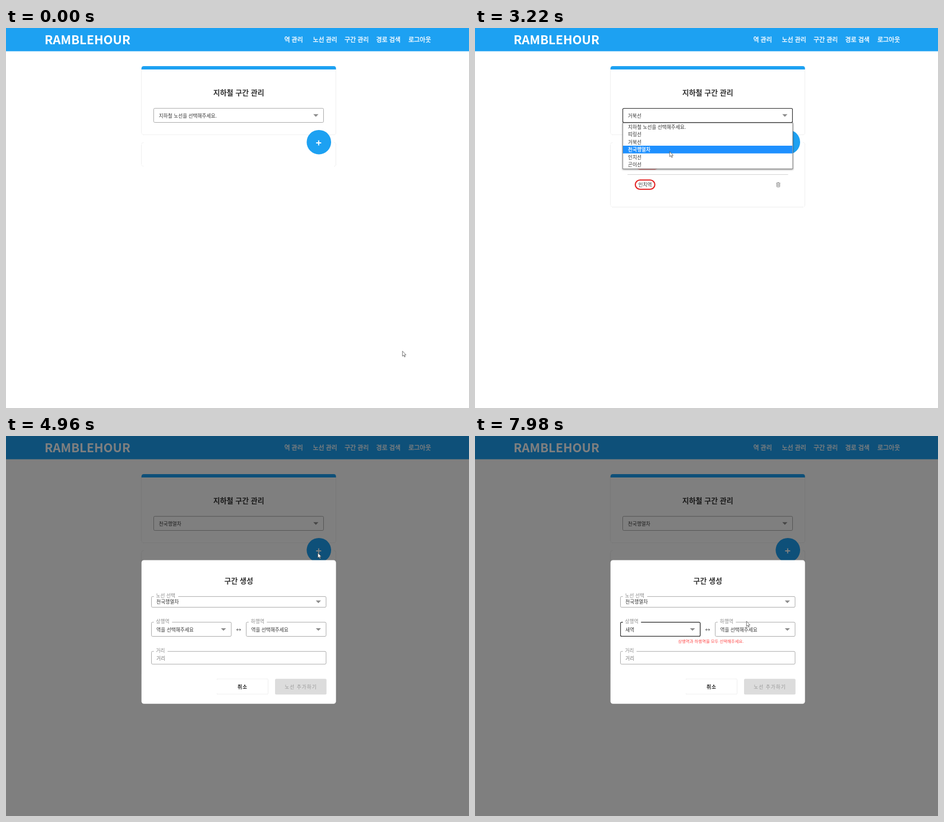
Animation, 826 px wide and 678 px high, one loop 8000 ms. Source, as an HTML page:

```html
<!DOCTYPE html>
<html lang="ko">
<head>
<meta charset="utf-8">
<title>지하철 구간 관리</title>
<style>
html, body { margin: 0; width: 100%; height: 100%; overflow: hidden; background: #fff; }
svg { display: block; width: 826px; height: 678px; }
text { font: 400 8.7px "Noto Sans CJK KR", "Noto Sans KR", "Noto Sans CJK", sans-serif; fill: #333; white-space: pre; }
.logo { font-size: 21.9px; font-weight: 700; fill: #fff; }
.nav text { font-size: 10.94px; fill: #fff; stroke: #fff; stroke-width: .35; }
.title { font-size: 13px; font-weight: 700; }
.mid { text-anchor: middle; }
.blue { fill: #1da1f2; }
.card { fill: #fff; filter: drop-shadow(0 .8px .7px rgba(0,0,0,.3)); }
.box { fill: #fff; stroke: #aaa; }
.ring { fill: none; stroke: #333; stroke-width: 1.2; }
.arrow { fill: #8c8c8c; }
.legend { fill: #8a8a8a; }
.hint { fill: #757575; }
.km { font-size: 6.4px; text-anchor: middle; }
.badge { fill: #fff; stroke-width: 2.1; }
.rule { stroke: #d3d3d3; }
.trash { fill: none; stroke: #8a8a8a; }
.btn { letter-spacing: 1px; font-weight: 700; fill: #222; }
.off { font-weight: 500; fill: #999; }
.err { font-size: 7.4px; fill: #ff4a4a; }
.menu-box { fill: #fff; stroke: #777; stroke-width: .9; filter: drop-shadow(0 1px 1.5px rgba(0,0,0,.45)); }
.hot rect { fill: #1e90ff; }
.hot text { fill: #fff; stroke: #fff; stroke-width: .25; }

/* The small lead keeps every change clear of its tick. */
.anim, .hot { animation: 8s step-end -4ms infinite; }
#pick0 { animation-name: pick0; }
#pick1, #list1 { animation-name: pick1; }
#pick2, #list2 { animation-name: pick2; }
#focus { animation-name: focus; }
#lines { animation-name: lines; }
#lines .hot { animation-name: lineRow; }
#sheet { animation-name: sheet; }
#modal { animation-name: modal; }
#upFocus { animation-name: upFocus; }
#stops { animation-name: stops; }
#stops .hot { animation-name: stopRow; }
#up0 { animation-name: up0; }
#up1, #error { animation-name: up1; }
#cursor { animation-name: cursor; }

@keyframes pick0 { 0% { opacity: 1 } 23.25%, 100% { opacity: 0 } }
@keyframes pick1 { 0% { opacity: 0 } 23.25% { opacity: 1 } 46.125%, 100% { opacity: 0 } }
@keyframes pick2 { 0% { opacity: 0 } 46.125%, 100% { opacity: 1 } }
@keyframes focus { 0% { opacity: 0 } 11.5% { opacity: 1 } 61%, 100% { opacity: 0 } }
@keyframes lines { 0%, 23.25%, 46.125%, 100% { opacity: 0 } 11.5%, 35.25% { opacity: 1 } }
@keyframes lineRow {
  0% { --r: 0 } 16.4% { --r: 1 } 21.25% { --r: 2 }
  39.25% { --r: 3 } 42.25% { --r: 4 } 44.25%, 100% { --r: 3 }
}
@keyframes sheet { 0% { height: 43px } 23.25% { height: 115.5px } 46.125%, 100% { height: 224.5px } }
@keyframes modal { 0% { opacity: 0 } 62%, 100% { opacity: 1 } }
@keyframes upFocus { 0% { opacity: 0 } 73.8%, 100% { opacity: 1 } }
@keyframes stops { 0%, 92.75%, 100% { opacity: 0 } 73.8% { opacity: 1 } }
@keyframes stopRow {
  0% { --r: 0 } 76.75% { --r: 1 } 77.75% { --r: 2 } 81.75% { --r: 3 }
  85.75% { --r: 4 } 88.75%, 100% { --r: 5 }
}
@keyframes up0 { 0% { opacity: 1 } 92.75%, 100% { opacity: 0 } }
@keyframes up1 { 0% { opacity: 0 } 92.75%, 100% { opacity: 1 } }
@keyframes cursor {
  0% { transform: translate(707px, 576px) }
  .875% { transform: translate(707px, 576px); animation-timing-function: steps(1, start) }
  1.82% { transform: translate(688px, 552px); animation-timing-function: steps(4, start) }
  5.6% { transform: translate(410px, 238px); animation-timing-function: steps(2, start) }
  7.5% { transform: translate(348px, 172px); animation-timing-function: steps(1, start) }
  9.5% { transform: translate(366px, 158px); animation-timing-function: steps(1, start) }
  11.5% { transform: translate(365px, 158px) }
  12.48% { transform: translate(365px, 158px); animation-timing-function: steps(7, start) }
  19.36% { transform: translate(346px, 193px) }
  21.25% { transform: translate(346px, 193px); animation-timing-function: steps(2, start) }
  23.25% { transform: translate(347px, 200px) }
  24.25% { transform: translate(347px, 200px); animation-timing-function: steps(8, start) }
  32.25% { transform: translate(358px, 152px); animation-timing-function: steps(2, start) }
  34.25% { transform: translate(358px, 143px); animation-timing-function: steps(1, start) }
  35.25% { transform: translate(357px, 150px) }
  36.25% { transform: translate(357px, 150px); animation-timing-function: steps(5, start) }
  41.25% { transform: translate(347px, 220px); animation-timing-function: steps(2, start) }
  43.25% { transform: translate(347px, 226px) }
  44.25% { transform: translate(347px, 226px); animation-timing-function: steps(1, start) }
  46.125% { transform: translate(347px, 222px) }
  47.125% { transform: translate(347px, 222px); animation-timing-function: steps(6, start) }
  53.125% { transform: translate(475px, 212px); animation-timing-function: steps(4, start) }
  57.125% { transform: translate(541px, 213px); animation-timing-function: steps(3, start) }
  60.125% { transform: translate(556px, 208px) }
  65% { transform: translate(556px, 208px); animation-timing-function: steps(1, start) }
  66.875% { transform: translate(556px, 209px); animation-timing-function: steps(1, start) }
  67.86% { transform: translate(540px, 218px); animation-timing-function: steps(4, start) }
  71.81% { transform: translate(350px, 328px); animation-timing-function: steps(2, start) }
  73.8% { transform: translate(326px, 345px) }
  74.77% { transform: translate(326px, 345px); animation-timing-function: steps(3, start) }
  77.75% { transform: translate(323px, 380px); animation-timing-function: steps(3, start) }
  80.75% { transform: translate(322px, 397px); animation-timing-function: steps(2, start) }
  82.75% { transform: translate(323px, 405px) }
  83.75% { transform: translate(323px, 405px); animation-timing-function: steps(7, start) }
  90.75% { transform: translate(326px, 431px) }
  93.75% { transform: translate(326px, 431px); animation-timing-function: steps(6, start) }
  99.75% { transform: translate(478px, 333px); animation-timing-function: steps(1, start) }
  100% { transform: translate(484px, 330px) }
}
</style>
</head>
<body>
<svg viewBox="0 0 826 678">
  <defs>
    <path id="tri" class="arrow" d="M-4.6 -2.2H4.6L0 2.4Z"/>
    <g id="bin" class="trash">
      <path d="M-3.6 -2.9H3.6M-1.4 -3.9H1.4"/>
      <path d="M-2.7 -2.5V3.1Q-2.7 3.9 -1.9 3.9H1.9Q2.7 3.9 2.7 3.1V-2.5M-.9 -1.4V2.5M.9 -1.4V2.5"/>
    </g>
  </defs>

  <rect class="blue" width="826" height="41.5"/>
  <text class="logo" x="68.7" y="29">RAMBLEHOUR</text>
  <g class="nav">
    <text x="496.5" y="24.8">역 관리</text>
    <text x="547.5" y="24.8">노선 관리</text>
    <text x="604" y="24.8">구간 관리</text>
    <text x="660.5" y="24.8">경로 검색</text>
    <text x="718" y="24.8">로그아웃</text>
  </g>

  <rect class="card" x="241.7" y="68" width="347" height="122.7" rx="4.4"/>
  <path class="blue" d="M241.7 74V72.4Q241.7 68 246.1 68H584.3Q588.7 68 588.7 72.4V74Z"/>
  <text class="title mid" x="415.2" y="119.6">지하철 구간 관리</text>
  <rect class="box" x="263.5" y="143.3" width="303" height="25.2" rx="2"/>
  <rect id="focus" class="ring anim" x="263.6" y="143.5" width="302.8" height="25" rx="2"/>
  <text id="pick0" class="anim" x="272.8" y="159.5">지하철 노선을 선택해주세요.</text>
  <text id="pick1" class="anim" x="272.8" y="159.5">거북선</text>
  <text id="pick2" class="anim" x="272.8" y="159.5">천국행열차</text>
  <use href="#tri" x="552.8" y="156"/>

  <rect id="sheet" class="card anim" x="241.7" y="204" width="347" height="43" rx="4.4"/>
  <g id="list1" class="anim"></g>
  <g id="list2" class="anim"></g>
  <circle class="blue" cx="558.2" cy="203.7" r="21.8"/>
  <path d="M553.3 205H562.3M557.8 200.5V209.5" stroke="#fff" stroke-width="1.9"/>
  <g id="lines" class="anim"></g>

  <g id="modal" class="anim">
    <rect width="826" height="678" fill="#000" fill-opacity=".5"/>
    <rect x="241.7" y="221.5" width="347" height="256.2" rx="4.4" fill="#fff"/>
    <text class="title mid" x="415.2" y="262.5">구간 생성</text>

    <rect class="box" x="259.5" y="286.4" width="311.5" height="19.2" rx="2"/>
    <rect x="263.8" y="284" width="43.4" height="5" fill="#fff"/>
    <text class="legend" x="267.6" y="288.2">노선 선택</text>
    <text x="268.3" y="299.4">천국행열차</text>
    <use href="#tri" x="557.3" y="295.8"/>

    <rect class="box" x="259.5" y="332.2" width="142.4" height="25.3" rx="2"/>
    <rect id="upFocus" class="ring anim" x="259.6" y="332.4" width="142.1" height="25" rx="2"/>
    <rect x="263.8" y="330" width="32.4" height="5" fill="#fff"/>
    <text class="legend" x="267.6" y="334.2">상행역</text>
    <text id="up0" class="anim" x="268.3" y="348.7">역을 선택해주세요</text>
    <text id="up1" class="anim" x="268.3" y="348.7">새역</text>
    <use href="#tri" x="388" y="345.2"/>

    <text class="mid" x="415.2" y="348.7">↔</text>

    <rect class="box" x="428.6" y="332.2" width="142.4" height="25.3" rx="2"/>
    <rect x="432.9" y="330" width="32.4" height="5" fill="#fff"/>
    <text class="legend" x="436.7" y="334.2">하행역</text>
    <text x="437.4" y="348.7">역을 선택해주세요</text>
    <use href="#tri" x="557.3" y="345.2"/>

    <text id="error" class="err mid anim" x="420.8" y="369.3">상행역과 하행역을 모두 선택해주세요.</text>

    <rect class="box" x="259.5" y="384.3" width="311.5" height="22.8" rx="2"/>
    <rect x="263.8" y="382" width="24.4" height="5" fill="#fff"/>
    <text class="legend" x="267.6" y="386.3">거리</text>
    <text class="hint" x="268.3" y="399.8">거리</text>

    <rect class="card" x="376" y="433.3" width="91.6" height="27.4" rx="2"/>
    <text class="btn mid" x="422" y="450.7">취소</text>
    <rect x="480" y="433.3" width="91.8" height="28" rx="2" fill="#dcdcdc"/>
    <text class="btn off mid" x="526" y="450.7">노선 추가하기</text>
  </g>
  <g id="stops" class="anim"></g>

  <path id="cursor" class="anim" d="M.3 .5V9.6L2.4 7.7L3.9 11L5.3 10.4L3.9 7.2H6.6Z" fill="#fff" stroke="#3a3a3a" stroke-width=".7"/>
</svg>
<script>
const $ = id => document.getElementById(id);
const ROW = 13.54;

// Dropdown with a highlighted copy clipped to row --r.
function menu(id, x, y, w, items) {
  const h = items.length * ROW;
  const rows = items.map((s, i) => `<text x="${x + 9}" y="${y + (i + .5) * ROW + 3.2}">${s}</text>`).join('');
  const clip = `inset(calc(var(--r) * ${ROW}px) 0 calc((${items.length - 1} - var(--r)) * ${ROW}px) 0)`;
  $(id).innerHTML = `<rect class="menu-box" x="${x - .3}" y="${y - .4}" width="${w + .6}" height="${h + .8}"/>${rows}
    <g class="hot" style="clip-path:${clip}"><rect x="${x}" y="${y}" width="${w}" height="${h}"/>${rows}</g>`;
}

function stations(id, color, rows) {
  $(id).innerHTML = rows.map(([name, km], i) => {
    const y = 243.1 + i * 36.28;
    const digits = name.replace(/\D/g, '').length;
    const w = (name.length - digits) * 8 + digits * 4.83 + 10.8;
    const mid = 286 + w + 22.6;
    const gap = km ? `<text class="km" x="${mid}" y="${y - .6}">다음역까지</text>
      <text class="km" x="${mid}" y="${y + 6.5}">${km}KM</text>
      <path class="rule" d="M272 ${y + 18.3}H558.5"/>` : '';
    return `<rect class="badge" stroke="${color}" x="286" y="${y - 8.1}" width="${w}" height="16.4" rx="8.2"/>
      <text x="291.5" y="${y + 3.5}">${name}</text>${gap}<use href="#bin" x="541" y="${y + .3}"/>`;
  }).join('');
}

menu('lines', 264, 169.6, 302.6,
  ['지하철 노선을 선택해주세요.', '띠링선', '거북선', '천국행열차', '인치선', '곤이선']);
menu('stops', 259.7, 358.8, 142,
  ['역을 선택해주세요', '일이삼사오육칠팔구십일이삼', '으아아아112', '안녕', '역추가역', '새역',
   '구아바역', '도라솔역', '춘식역', '삭정역', '곤이역', '인치역', '신도림역', '잠실역', '역삼역',
   '정자역', '판교역', '강남역']);
stations('list1', '#e32020', [['신도림역', 10], ['인치역']]);
stations('list2', '#9acd32', [['도라솔역', 79], ['으아아아112', 19],
  ['일이삼사오육칠팔구십일이삼', 24], ['구아바역', 100], ['춘식역']]);
</script>
</body>
</html>
```
